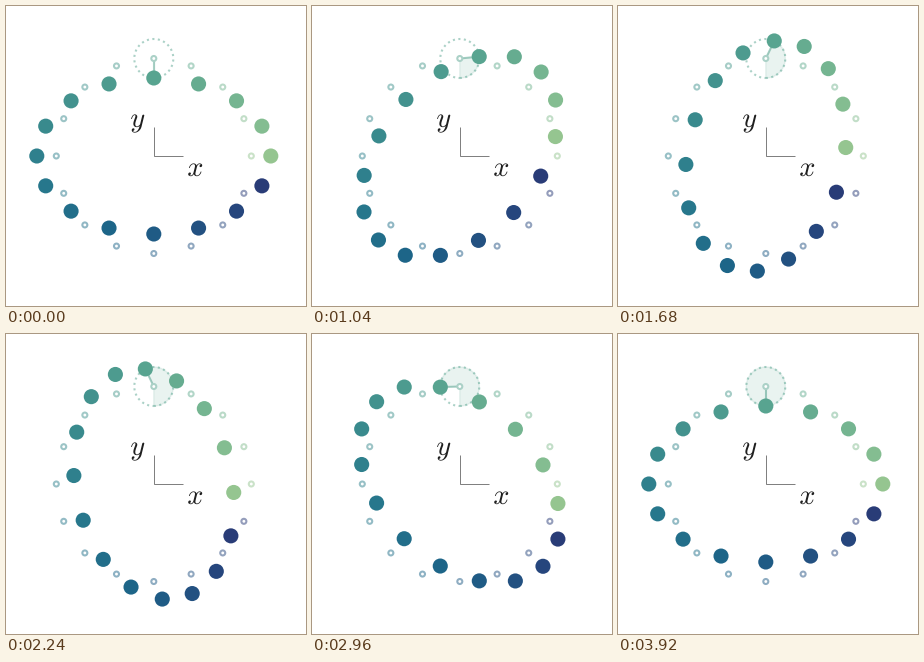
Recreate the animation shown at these times as a matplotlib script. Size 300 px wide and 300 px high, loop 4 s.

```python
import numpy as np
import matplotlib.pyplot as plt
from matplotlib.animation import FuncAnimation
from matplotlib.colors import LinearSegmentedColormap
from matplotlib.patches import PathPatch
from matplotlib.textpath import TextPath
from matplotlib.transforms import Affine2D

plt.rcParams["mathtext.fontset"] = "cm"

SIZE, DPI = 300, 100
PX = 72 / DPI  # points per pixel
FRAMES, INTERVAL = 50, 80
COUNT = 16
CX, CY, RADIUS = 147.8, 150, 97.5
STRAIN = 0.2
ORBIT = STRAIN * RADIUS
TOP = COUNT // 4

cmap = LinearSegmentedColormap.from_list("sea", [
    "#a5cd90", "#7dba91", "#59a590", "#40908e",
    "#287a8c", "#1c6488", "#254b7f", "#2c3172"])
colors = cmap(np.arange(1, COUNT + 1) / (COUNT + 1))[:, :3]
tint = colors[TOP]

angles = 2 * np.pi * np.arange(COUNT) / COUNT
rest_x, rest_y = RADIUS * np.cos(angles), RADIUS * np.sin(angles)
hub_x, hub_y = CX, CY - RADIUS

fig = plt.figure(figsize=(SIZE / DPI, SIZE / DPI), dpi=DPI, facecolor="white")
ax = fig.add_axes([0, 0, 1, 1])
ax.set_xlim(0, SIZE)
ax.set_ylim(SIZE, 0)
ax.axis("off")


def arc(start, stop, n=121):
    """Points on the small circle, measured from straight down."""
    t = np.linspace(start, stop, n)
    return hub_x + ORBIT * np.sin(t), hub_y + ORBIT * np.cos(t)


def label(x, y, text, size=28.3):
    """Draw a formula as an outline centred on (x, y)."""
    path = TextPath((0, 0), text, size=size)
    box = path.get_extents()
    place = Affine2D().translate(-(box.x0 + box.x1) / 2, -(box.y0 + box.y1) / 2)
    place.scale(1, -1).translate(x, y)
    ax.add_patch(PathPatch(place.transform_path(path), color="0.12", lw=0))


# Coordinate axes
ax.plot([CX, CX, CX + 29], [CY - 29, CY, CY], color="0.5", lw=1 * PX,
        solid_capstyle="butt", solid_joinstyle="miter", zorder=1)
label(189.2, 163.8, "$x$")
label(131.7, 117.5, "$y$")

# Phase dial around the top particle
wedge, = ax.fill([hub_x], [hub_y], facecolor=tint, edgecolor=tint,
                 alpha=0.13, lw=1.4 * PX, zorder=2)
ax.plot(*arc(0, 2 * np.pi), ls=":", color=tint, alpha=0.5,
        lw=2.08 * PX, zorder=3)
hand, = ax.plot([], [], color=tint, alpha=0.5, lw=2.08 * PX, zorder=4)

# Rest positions and moving particles
ax.scatter(CX + rest_x, CY - rest_y, s=(5 * PX) ** 2, facecolor="white",
           edgecolor=0.5 + 0.5 * colors, linewidth=2.08 * PX, zorder=5)
dots = ax.scatter(CX + rest_x, CY - rest_y, s=(15.1 * PX) ** 2, c=colors,
                  linewidth=0, zorder=6)


def update(i):
    phase = 2 * np.pi * i / (FRAMES - 1)
    plus, cross = STRAIN * np.cos(phase), STRAIN * np.sin(phase)
    x = CX + rest_x * (1 + plus) + rest_y * cross
    y = CY - rest_y * (1 - plus) - rest_x * cross
    dots.set_offsets(np.column_stack([x, y]))
    hand.set_data([hub_x, x[TOP]], [hub_y, y[TOP]])
    rim = np.column_stack(arc(0, phase))
    wedge.set_xy(np.vstack([[hub_x, hub_y], rim]))
    return dots, hand, wedge


anim = FuncAnimation(fig, update, frames=FRAMES, interval=INTERVAL,
                     repeat=True, repeat_delay=0)
plt.show()
```
